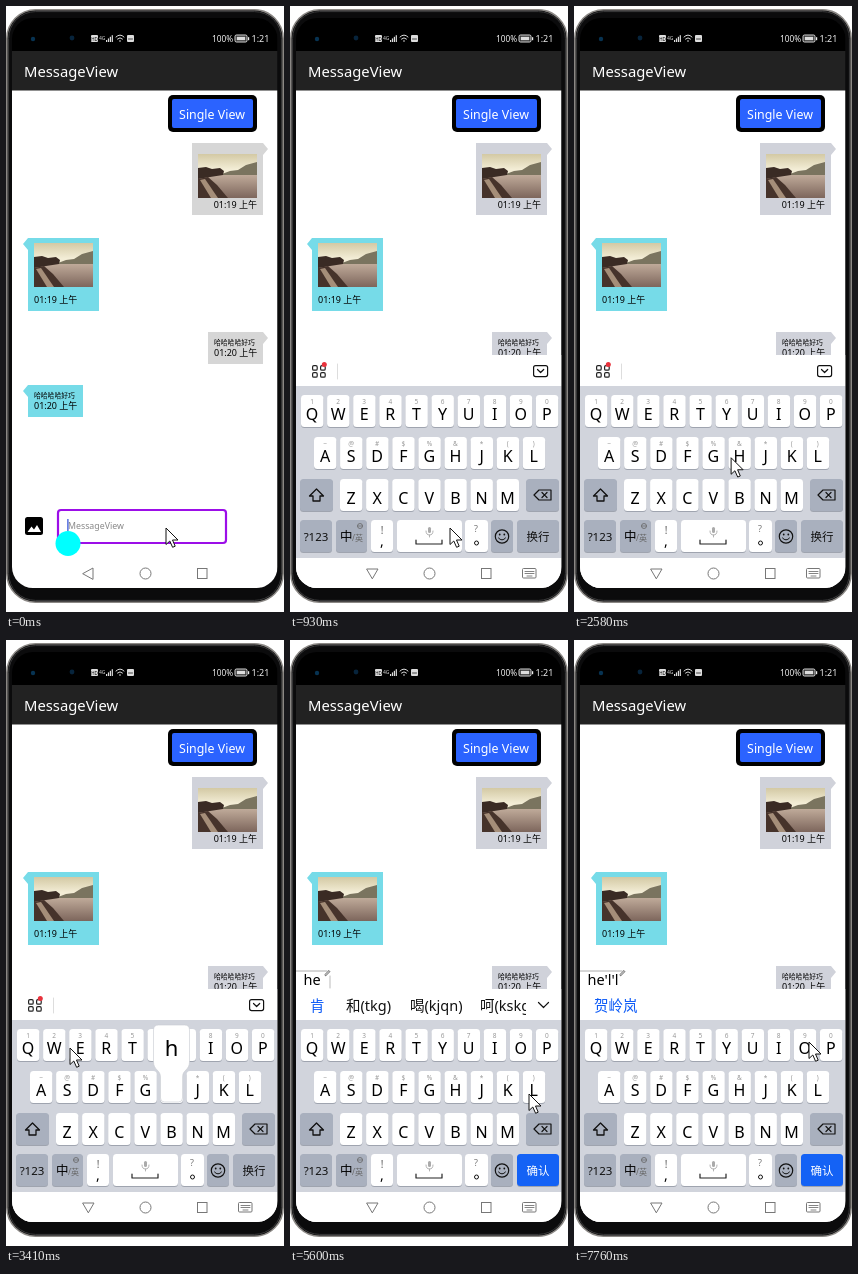
Recreate the animation shown at these times as an HTML page. Size 278 by 606 pixels, loop 8 s.

```html
<!DOCTYPE html>
<html lang="zh">
<head>
<meta charset="utf-8">
<title>Message view</title>
<style>
html, body { margin: 0; width: 100%; height: 100%; overflow: hidden; background: #fff; }
svg { display: block; width: 100%; height: 100%; }
text { font-family: "Noto Sans", "Noto Sans CJK SC", "Noto Sans CJK", sans-serif; white-space: pre; }
</style>
</head>
<body>
<svg id="stage" viewBox="0 0 278 606"></svg>
<script>
const LOOP = 8000;
const BLUE = '#0a59f7', CYAN = '#76dbe8', KEY_GREY = '#a9b0be';
const LEFT = 6, WIDTH = 265.5;

const rect = (x, y, w, h, fill, r = 0, more = '') =>
  `<rect x="${x}" y="${y}" width="${w}" height="${h}" rx="${r}" fill="${fill}" ${more}/>`;
const band = (y, h, fill) => rect(LEFT, y, WIDTH, h, fill);
const text = (x, y, size, string, fill = '#000', anchor = 'start') =>
  `<text x="${x}" y="${y}" font-size="${size}" fill="${fill}" text-anchor="${anchor}">${string}</text>`;
const path = (d, fill, more = '') => `<path d="${d}" fill="${fill}" ${more}/>`;
const line = (d, color, width = 1) =>
  path(d, 'none', `stroke="${color}" stroke-width="${width}" stroke-linecap="round" stroke-linejoin="round"`);
const dot = (x, y, r, fill, more = '') => `<circle cx="${x}" cy="${y}" r="${r}" fill="${fill}" ${more}/>`;
const group = (id, content, more = '') => `<g id="${id}" ${more}>${content}</g>`;

const defs = `<defs>
  <clipPath id="screen">${rect(LEFT, 12, WIDTH, 570, '#000', 21)}</clipPath>
  <clipPath id="candidateClip">${rect(LEFT, 350, 230, 29, '#000')}</clipPath>
  <linearGradient id="sky" x2="0" y2="1"><stop stop-color="#d3c9a4"/><stop offset=".35" stop-color="#f3edd6"/></linearGradient>
  <linearGradient id="water" x2="0" y2="1"><stop stop-color="#c2ad9c"/><stop offset="1" stop-color="#7d665c"/></linearGradient>
</defs>`;

const photo = (x, y) => `<g transform="translate(${x} ${y})">
  ${rect(0, 0, 59, 44, 'url(#sky)')}
  ${rect(0, 20, 59, 24, 'url(#water)')}
  ${path('M24 20L32 17 40 16 48 11 59 8V21H24Z', '#7a745f')}
  ${path('M0 14L8 13 14 15 22 14 26 17 25 21 12 23 0 25Z', '#3a2b24')}
  ${path('M0 25L10 23 19 31 30 44H0Z', '#46332b')}
  ${path('M2 26L7 25 20 44H13Z', '#a58e79')}
</g>`;

const phone = rect(.8, 3.8, 276.4, 592.4, '#0b0b0c', 29, 'stroke="#8b8885" stroke-width="1.6"')
  + rect(2.6, 5.6, 272.8, 588.8, 'none', 27, 'stroke="#3a3a3b"');

const status = band(12, 33, '#000')
  + dot(27, 33, 2.2, '#073352') + dot(66, 32, 2.4, '#07243c')
  + rect(85, 29, 7, 7, '#ddd', 1) + text(88.5, 34.5, 4.5, 'HD', '#000', 'middle')
  + text(93, 34, 5, '4G', '#ddd')
  + [0, 1, 2, 3].map(i => rect(100 + i * 1.9, 34 - i * 1.6, 1.2, 2 + i * 1.6, '#ddd')).join('')
  + line('M110 31Q114 27 118 31M111.5 33Q114 30.5 116.5 33M113.5 35H114.5', '#ddd')
  + rect(121, 29, 7, 7, '#ddd', 1) + line('M122.5 33H126.5', '#444')
  + text(206, 36, 8.3, '100%', '#eee')
  + rect(229, 29, 12, 7, '#333', 1.5, 'stroke="#eee" stroke-width=".9"') + rect(230.8, 30.8, 8.4, 3.4, '#ddd')
  + rect(242, 31.2, 1.2, 3, '#eee') + text(245.5, 36, 9, '1:21', '#eee');

const header = band(45, 40, '#222') + text(18, 71, 14.8, 'MessageView', '#fff');

const rightBubble = (x, y, h) =>
  path(`M${x} ${y}H257L262 ${y + 6}L257 ${y + 12}V${y + h}H${x}Z`, 'inherit', 'class="mine"');
const leftBubble = (y, w, h) => path(`M${22 + w} ${y}H22L17 ${y + 6}L22 ${y + 12}V${y + h}H${22 + w}Z`, CYAN);

const chat = band(84.5, 497.5, '#fff')
  + rect(162, 89, 89, 37, '#000', 5) + rect(166, 93, 81, 29, '#2b63ff', 2)
  + text(206, 112.5, 12.4, 'Single View', '#fff', 'middle')
  + rightBubble(186, 137, 72) + photo(192, 148) + text(251, 202, 9, '01:19 上午', '#000', 'end')
  + leftBubble(232, 71, 73) + photo(28, 237) + text(28, 297, 9, '01:19 上午')
  + rightBubble(202, 326, 32) + text(208, 339, 6.8, '哈哈哈哈好巧') + text(208, 350, 9, '01:20 上午')
  + leftBubble(379, 55, 32) + text(28, 392, 6.8, '哈哈哈哈好巧') + text(28, 403, 9, '01:20 上午');

const input = rect(19, 511, 18, 18, '#000', 2.5) + path('M21.5 526L25.5 520.5 28 523.5 31 519 35 526Z', '#fff')
  + rect(52, 504, 168, 33, '#fff', 3, 'stroke="#9c0ee8" stroke-width="2.2"')
  + text(62, 523, 8.8, 'MessageView', '#888')
  + rect(61.3, 513, 1.2, 12, '#2b4bd8') + dot(62, 537.5, 12.5, '#0ff');

const key = (x, y, w, fill = '#fff', h = 32) =>
  rect(x, y + 1, w, h, '#9fa4af', 3.5) + rect(x, y, w, h, fill, 3.5);
const keyRow = (letters, hints, firstX, y) => [...letters].map((letter, i) => {
  const x = firstX + i * 26.1;
  return key(x - 11, y, 22.4) + text(x, y + 25, 16, letter, '#000', 'middle')
    + (hints ? text(x, y + 8.5, 6.5, hints[i], '#999', 'middle') : '');
}).join('');

const keyboard = band(349, 31, '#fff') + band(380, 172, '#d1d4dc')
  + keyRow('QWERTYUIOP', '1234567890', 22, 389)
  + keyRow('ASDFGHJKL', ['~', '@', '#', '$', '%', '&amp;', '*', '(', ')'], 35, 431)
  + keyRow('ZXCVBNM', '', 61, 473)
  + key(10, 473, 33, KEY_GREY) + line('M26.5 483L19.5 490H23V495H30V490H33.5Z', '#111', 1.3)
  + key(236, 473, 33, KEY_GREY)
  + line('M244 489L249 484H261V494H249ZM252 486.5L257 491.5M257 486.5L252 491.5', '#111', 1.2)
  + key(10, 514, 32, KEY_GREY) + text(26, 535, 11.5, '?123', '#111', 'middle')
  + key(46, 514, 31, KEY_GREY) + text(50, 535, 12.5, '中') + text(62, 535, 8, '/英', '#666')
  + dot(70, 520, 2.5, 'none', 'stroke="#666" stroke-width=".8"') + line('M67.5 520H72.5', '#666', .7)
  + key(81, 514, 22) + text(92, 528, 10, '!', '#555', 'middle') + text(92, 540, 14, ',', '#000', 'middle')
  + key(107, 514, 65) + rect(138, 521, 3, 6, '#aaa', 1.5)
  + line('M136 525Q136 529 139.5 529 143 529 143 525M139.5 529V531', '#aaa', .9)
  + line('M126 534V538H152V534', '#222', 1.2)
  + key(175, 514, 23) + text(186, 526, 9, '?', '#777', 'middle')
  + dot(186.5, 537, 2, 'none', 'stroke="#111"')
  + key(201, 514, 22, KEY_GREY) + dot(212, 530.5, 6.7, 'none', 'stroke="#111" stroke-width="1.2"')
  + dot(209.7, 528.5, .9, '#111') + dot(214.3, 528.5, .9, '#111') + line('M208.5 532Q212 536 215.5 532', '#111')
  + group('enter', key(227, 514, 42, KEY_GREY) + text(248, 535, 11.5, '换行', '#111', 'middle'))
  + group('confirm', key(227, 514, 42, '#1462f5') + text(248, 535, 11.5, '确认', '#fff', 'middle'))
  + group('toolbar', [[22, 359], [30, 359], [22, 366], [30, 366]]
      .map(([x, y]) => rect(x + .6, y + .6, 4.6, 4.6, '#fff', 1.3, 'stroke="#222" stroke-width="1.2"')).join('')
    + dot(34.3, 358.5, 2.5, '#e8323c') + line('M47.5 358V373', '#ddd')
    + rect(243.6, 359.6, 14, 11, '#fff', 2, 'stroke="#111" stroke-width="1.2"')
    + line('M247.5 363.5L250.6 366.5 253.7 363.5', '#111', 1.2));

const nav = group('navIdle', line('M77 567.5L87 562V573Z', '#777'))
  + group('navHide', line('M77 563H88L82.5 572.5Z', '#777'))
  + dot(139.5, 567.5, 5.5, 'none', 'stroke="#777"')
  + rect(191.5, 562.5, 9.5, 10, 'none', 0, 'stroke="#777"')
  + group('navKeyboard', rect(232.5, 562.5, 13.5, 9.5, 'none', 1, 'stroke="#777"')
    + line('M235 565.5H244M235 567.5H244M237 570H242', '#777', .9));

const bubblePath = 'M-13 385H13Q18 385 18 390V422C18 430 11 430 11 437V458Q11 462 7 462H-7Q-11 462 -11 458V437C-11 430 -18 430 -18 422V390Q-18 385 -13 385Z';
const popup = path(bubblePath, '#fff', 'stroke="#c6c9d1" stroke-width=".6"')
  + '<text id="popupLetter" y="415.5" font-size="22" font-weight="500" text-anchor="middle"></text>';

const pointer = path('M0 0V16.5L3.8 13 6.6 19.3 9.2 18.2 6.5 12H12Z', '#fff', 'stroke="#111" stroke-linejoin="round"');

const stage = document.getElementById('stage');
stage.innerHTML = defs + phone + `<g clip-path="url(#screen)">`
  + status + header + chat + group('input', input) + group('keyboard', keyboard) + group('candidates', '')
  + group('navBase', band(552, 30, '#fff')) + nav + '</g>'
  + group('popup', popup) + group('pointer', pointer);

const el = id => document.getElementById(id);
const show = (id, on) => el(id).setAttribute('display', on ? 'inline' : 'none');
const move = (id, x, y) => el(id).setAttribute('transform', `translate(${x} ${y})`);

// Bursts of motion: first picture, last picture, number of pictures.
const bursts = [[780, 1760, 8], [1910, 2730, 7], [3010, 3670, 6], [4230, 5170, 8],
  [5320, 5600, 3], [6260, 7220, 8], [7340, 7760, 4]];
function snap(t) {
  const burst = bursts.findLast(([start]) => t >= start);
  if (!burst) return 0;
  const [start, end, count] = burst, step = (end - start) / (count - 1);
  return start + step * Math.min(count - 1, Math.floor((t - start + 15) / step));
}

const pointerTrack = [[0, 160, 522], [930, 160, 522], [1620, 111, 434], [1760, 109, 432], [2730, 165, 455],
  [3142, 165, 455], [3406, 64, 408], [3670, 70, 410], [4364, 70, 410], [4633, 158, 454],
  [5170, 231, 454], [5600, 239, 454], [6260, 239, 454], [6808, 239.5, 444], [7220, 239.5, 444],
  [7760, 235, 402], [LOOP, 235, 402]];
function pointerAt(t) {
  const next = Math.max(1, pointerTrack.findIndex(([time]) => time >= t));
  const [t0, x0, y0] = pointerTrack[next - 1], [t1, x1, y1] = pointerTrack[next];
  const k = (t - t0) / (t1 - t0);
  return [x0 + (x1 - x0) * k, y0 + (y1 - y0) * k];
}

// Key presses: from, until, letter, key centre, vertical offset of the bubble.
const presses = [[3010, 3540, 'h', 165.5, 0], [4230, 4490, 'e', 74.2, -42],
  [6260, 6530, 'l', 244.3, 0], [6660, 6940, 'l', 244.3, 0]];

// Typed text: start, letters, width of its box, candidates with positions.
const typed = [
  [3540, 'h', 24, [[20, '上'], [56, '目(hhh)'], [120, '止(hhg)'], [190, '卡(hhu)']]],
  [4490, 'he', 33, [[20, '肯'], [56, '和(tkg)'], [120, '喝(kjqn)'], [190, '呵(kskg)']]],
  [6390, "he'l", 38, [[20, '贺岭']]],
  [6660, "he'l'l", 44, [[20, '贺岭岚']]]
];
function drawCandidates([, letters, width, words]) {
  const right = 7 + width;
  return rect(LEFT, 331, width + 1, 18, '#fff') + line(`M${LEFT} 331H${right - 3}`, '#999', .8)
    + (words.length > 1 ? line(`M${right} 336V348`, '#aaa', .8) : '')
    + line(`M${right - 5} 334.5L${right - 1} 330.5L${right} 331.5L${right - 4} 335.5Z`, '#333', .8)
    + text(13.5, 345, 14.5, letters)
    + `<g clip-path="url(#candidateClip)">`
    + words.map(([x, word], i) => text(x, 370.5, 14.5, word, i ? '#111' : BLUE)).join('') + '</g>'
    + (words.length > 1 ? line('M248.5 362.5L253.5 367.5 258.5 362.5', '#111', 1.2) : '');
}

let shownTyped = null;
function render(now) {
  const t = snap(now % LOOP);
  const open = t >= 780, risen = t >= 915;
  const entry = typed.findLast(([start]) => t >= start);
  const press = presses.find(([from, until]) => t >= from && t < until);

  show('input', !open);
  show('keyboard', open);
  move('keyboard', 0, risen ? 0 : 129);
  show('navBase', risen);
  show('navIdle', !risen);
  show('navHide', risen);
  show('navKeyboard', open);
  for (const bubble of document.querySelectorAll('.mine')) bubble.setAttribute('fill', risen ? '#d0d2da' : '#d6d6d6');

  show('toolbar', !entry);
  show('enter', !entry);
  show('confirm', entry);
  if (entry !== shownTyped) {
    el('candidates').innerHTML = entry ? drawCandidates(entry) : '';
    shownTyped = entry;
  }

  show('popup', press);
  if (press) {
    el('popupLetter').textContent = press[2];
    move('popup', press[3], press[4]);
  }
  move('pointer', ...pointerAt(t));
}

function tick() {
  render(performance.now());
  requestAnimationFrame(tick);
}
tick();
</script>
</body>
</html>
```
